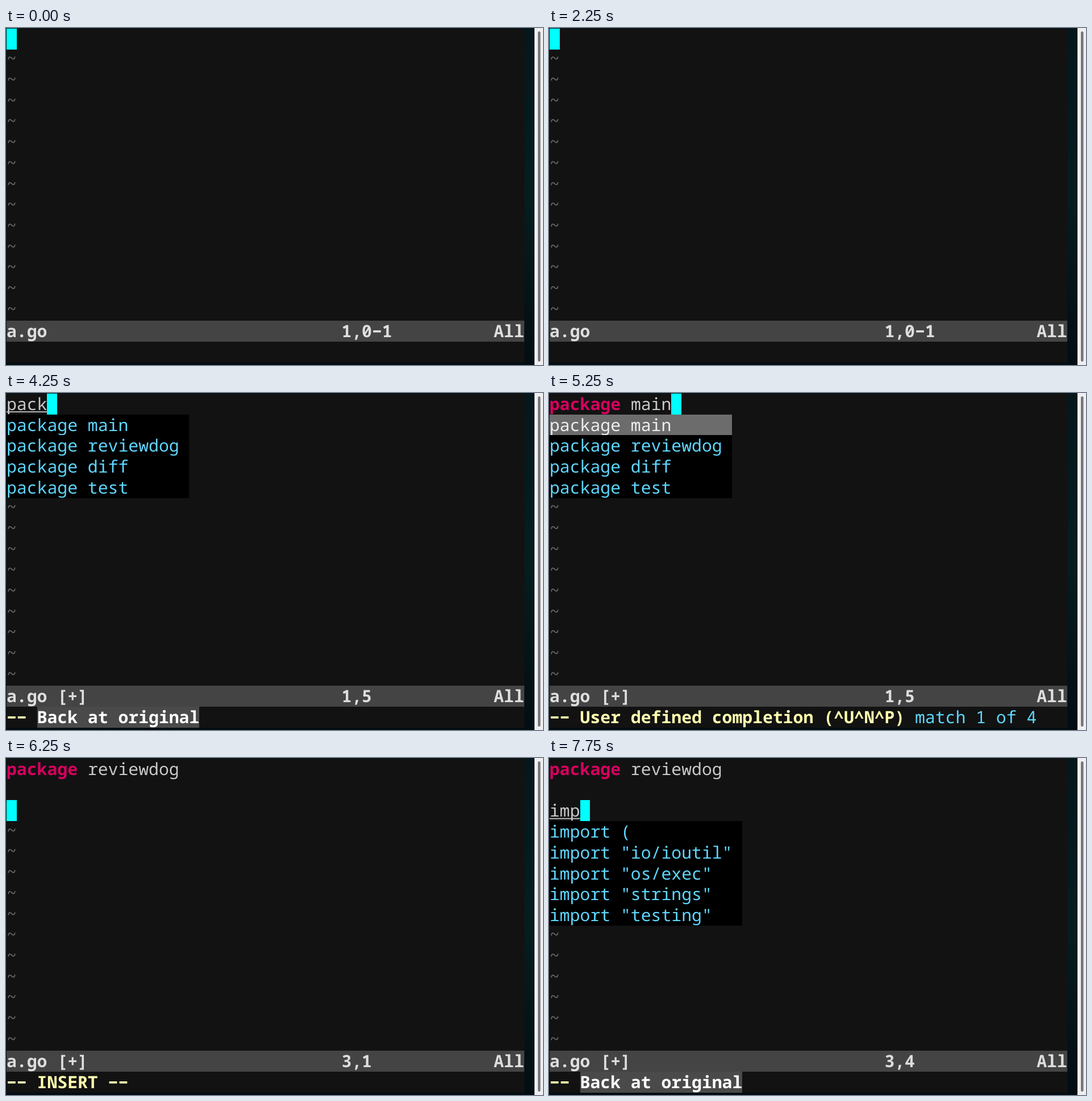
Write an HTML page that moves like this. It is 945 px wide and 593 px high and loops after 8 s.

```html
<!DOCTYPE html>
<html>
<head>
<meta charset="utf-8">
<style>
  html, body { margin: 0; width: 100%; height: 100%; overflow: hidden; background: #04151a; }
  svg { display: block; }
  text {
    font: 29.77px "Noto Sans Mono", monospace;
    white-space: pre;
    text-rendering: geometricPrecision;
  }
  .bold { font-weight: 700; }
</style>
</head>
<body>
<svg width="945" height="593" viewBox="0 0 945 593">
  <defs>
    <linearGradient id="edge" x2="0" y2="1">
      <stop stop-color="#04171c"/>
      <stop offset=".5" stop-color="#061d20"/>
      <stop offset="1" stop-color="#020d13"/>
    </linearGradient>
  </defs>
  <rect width="931" height="593" fill="url(#edge)"/>
  <rect x="1" y="1" width="911.5" height="588" fill="#121212"/>
  <rect x="930" width="15" height="593" fill="#efeff1"/>
  <rect x="936" y="6" width="4.5" height="581" rx="2.2" fill="#75747a"/>
  <g id="screen"></g>
</svg>
<script>
const DURATION = 8000, CELL_W = 17.86, CELL_H = 36.72;
const YELLOW = '#ffffaf', CYAN = '#5fd7ff', PLAIN = '#c9c9c9';
const screen = document.getElementById('screen');

const left = col => 1 + col * CELL_W;
const top_ = row => 1 + row * CELL_H;
const escape = s => s.replace(/&/g, '&amp;').replace(/</g, '&lt;');

const box = (col, row, cols, color) => {
  const x = Math.round(left(col)), y = Math.round(top_(row));
  const w = Math.round(left(col + cols)) - x, h = Math.round(top_(row + 1)) - y;
  return `<rect x="${x}" y="${y}" width="${w}" height="${h}" fill="${color}"/>`;
};
// Terminal dashes fill their cell, so hyphens are set as minus signs.
const text = (col, row, s, color, bold = false, lift = 0) =>
  `<text x="${left(col)}" y="${top_(row) + 29 - lift}" fill="${color}"` +
  `${bold ? ' class="bold"' : ''}>${escape(s.replace(/-/g, '\u2212'))}</text>`;

const packages = ['main', 'reviewdog', 'diff', 'test'].map(s => 'package ' + s);
const imports = ['(', '"io/ioutil"', '"os/exec"', '"strings"', '"testing"'].map(s => 'import ' + s);
const X_MODE = '^X mode (^]^D^E^F^I^K^L^N^O^Ps^U^V^Y)';
const BACK = 'Back at original';
const COMPLETION = 'User defined completion (^U^N^P)';

// Each step changes only the listed parts of the editor state.
const steps = [
  [0, { lines: [''], cursor: true, file: 'a.go', ruler: '1,0-1', mode: '', menu: [], pick: -1 }],
  [500, { cursor: false }],
  [1000, { cursor: true }],
  [1750, { cursor: false }],
  [2250, { cursor: true }],
  [2500, { mode: 'INSERT --', ruler: '1,1' }],
  [2750, { lines: ['p'], file: 'a.go [+]', ruler: '1,2' }],
  [3000, { lines: ['pa'], ruler: '1,3' }],
  [3250, { lines: ['pack'], ruler: '1,5' }],
  [4000, { mode: X_MODE }],
  [4250, { mode: BACK, menu: packages }],
  [5250, { mode: COMPLETION, lines: [packages[0]], pick: 0 }],
  [5500, { lines: [packages[1]], pick: 1 }],
  [6250, { mode: 'INSERT --', lines: [packages[1], '', ''], menu: [], pick: -1, ruler: '3,1' }],
  [6500, { lines: [packages[1], '', 'i'], ruler: '3,2' }],
  [6750, { lines: [packages[1], '', 'im'], ruler: '3,3' }],
  [7000, { lines: [packages[1], '', 'imp'], ruler: '3,4' }],
  [7500, { mode: X_MODE }],
  [7750, { mode: BACK, menu: imports }],
];

function codeLine(line, row) {
  if (!line) return '';
  const [word, name] = line.split(' ');
  if (name) return text(0, row, word, '#d7005f', true) + text(word.length + 1, row, name, PLAIN);
  const underline = `<rect x="1" y="${top_(row) + 31.3}" width="${line.length * CELL_W}" height="1.8" fill="${PLAIN}"/>`;
  return text(0, row, line, PLAIN) + underline;
}

function modeLine({ mode, pick, menu }) {
  if (!mode) return '';
  let out = text(0, 15, '--', YELLOW, true);
  if (mode === BACK) out += box(3, 15, mode.length, '#4a4a4a');
  out += text(3, 15, mode, mode === BACK ? '#fff' : YELLOW, true);
  if (pick >= 0) out += text(36, 15, `match ${pick + 1} of ${menu.length}`, CYAN);
  return out;
}

function render(state) {
  const { lines, cursor, file, ruler, menu, pick } = state;
  const row = lines.length - 1;
  let out = lines.map(codeLine).join('');
  for (let r = lines.length + menu.length; r < 14; r++) out += text(0, r, '~', '#686868', false, 2.5);
  if (cursor) out += box(lines[row].length, row, 1, '#0ff');

  const menuWidth = Math.max(...menu.map(s => s.length)) + 1;
  menu.forEach((item, i) => {
    const selected = i === pick, r = row + 1 + i;
    out += box(0, r, menuWidth, selected ? '#6c6c6c' : '#000');
    out += text(0, r, item, selected ? '#eee' : CYAN);
  });

  out += box(0, 14, 51, '#444');
  for (const [col, s] of [[0, file], [33, ruler], [48, 'All']]) out += text(col, 14, s, '#dedede', true);
  screen.innerHTML = out + modeLine(state);
}

let shown = -1;
function tick() {
  const time = performance.now() % DURATION;
  const count = steps.filter(([start]) => start <= time).length;
  if (count !== shown) {
    shown = count;
    render(Object.assign({}, ...steps.slice(0, count).map(step => step[1])));
  }
  requestAnimationFrame(tick);
}
tick();
</script>
</body>
</html>
```
